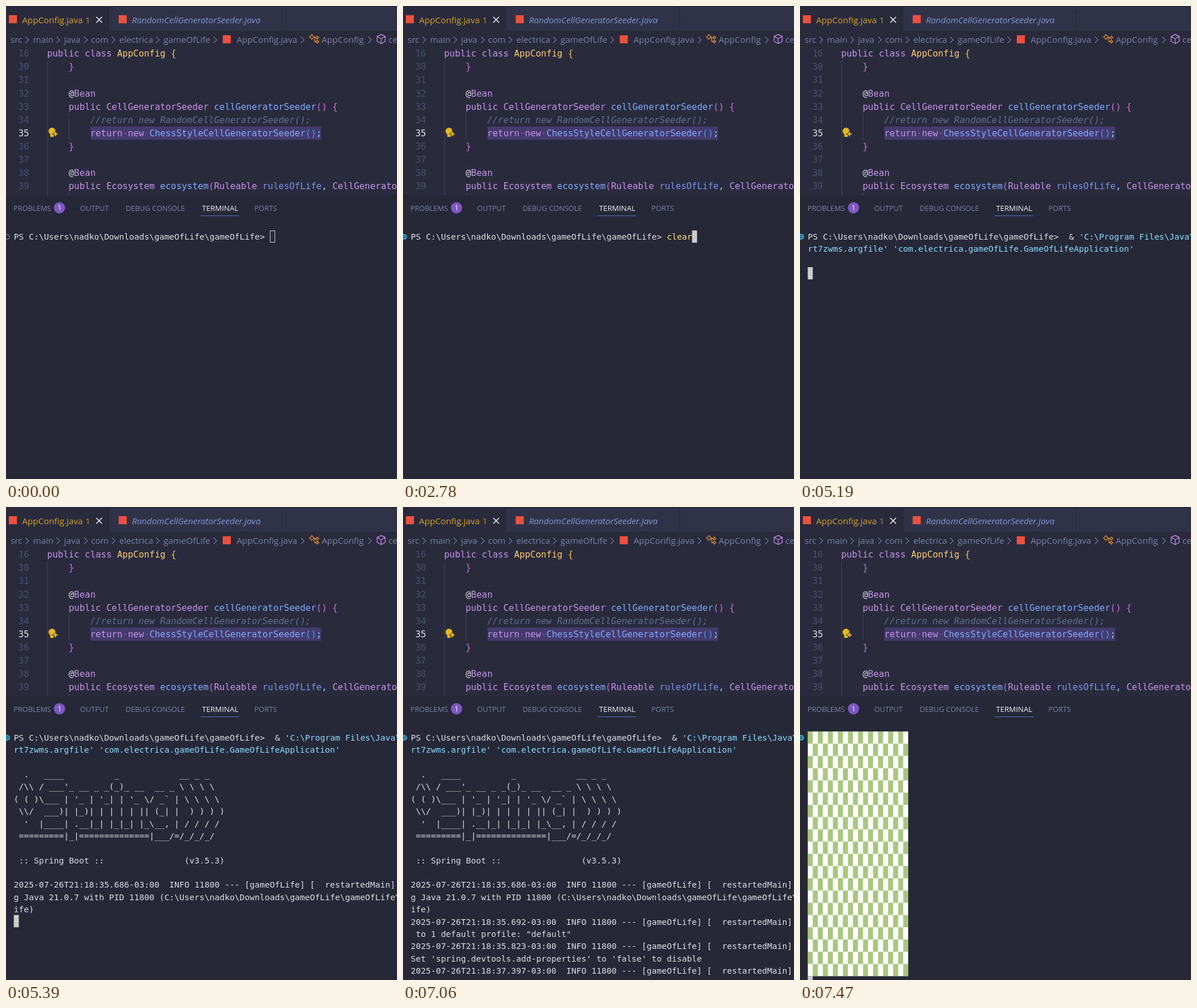
An HTML page that plays this animation: 680x824 px, repeating every 8000 ms.

```html
<!DOCTYPE html>
<html lang="en">
<head>
<meta charset="utf-8">
<title>Terminal run</title>
<style>
html, body { margin: 0; width: 100%; height: 100%; overflow: hidden; background: #262838; }
svg { display: block; position: absolute; left: 0; top: 0; }
text { white-space: pre; }
.code { font: 15.56px "DejaVu Sans Mono", monospace; }
.term { font: 14.51px "DejaVu Sans Mono", monospace; fill: #dcdee4; }
.ui { font: 15.1px "Open Sans", sans-serif; fill: #7b80a2; }
.tab { font: 12.6px "Open Sans", sans-serif; fill: #7d829e; }
.tab.active { font-size: 13.1px; fill: #f0f1f6; }
.timed { opacity: 0; animation: 8s step-end infinite; }
</style>
</head>
<body>
<svg id="stage" width="680" height="824" viewBox="0 0 680 824">
  <defs>
    <clipPath id="editorClip"><rect width="680" height="330"/></clipPath>
    <pattern id="cells" x="13.5" y="391" width="17.47" height="42.64" patternUnits="userSpaceOnUse">
      <rect width="17.47" height="42.64" fill="#fff"/>
      <path d="M0 0h8.735v21.32H0zM8.735 21.32h8.735v21.32H8.735z" fill="#a9c77d"/>
    </pattern>
  </defs>

  <rect width="680" height="330" fill="#292b3d"/>
  <rect width="680" height="43" fill="#303348"/>
  <rect width="180" height="43" fill="#292b3d"/>
  <rect width="680" height="2" fill="#282a3b"/>
  <path d="M480.500 2V43" stroke="#292b3d"/>
  <g fill="#ef4f3b">
    <rect x="5" y="16" width="14" height="14"/>
    <rect x="196" y="16" width="14" height="14"/>
    <rect x="377" y="51" width="14" height="14"/>
  </g>
  <path d="M157 19l10 10m0-10l-10 10" stroke="#f0f0f5" stroke-width="1.500"/>

  <g fill="none" stroke="#e08a2e" stroke-width="1.400">
    <path d="M528 54l4-4 4 4-4 4zM535 55h4M537 55v7h2"/>
    <path d="M539 55l2.500-2.500 2.500 2.500-2.500 2.500zM539 62l2.500-2.500 2.500 2.500-2.500 2.500z"/>
  </g>
  <path d="M652.500 49.500l7 3.500v8.500l-7 4-7-4V53zM645.500 53l7 4 7-4M652.500 57v8.500" fill="none" stroke="#b884dd" stroke-width="1.400"/>

  <g id="editor" clip-path="url(#editorClip)">
    <path d="M72.500 95V330M109.500 186V233M109.500 325V330" stroke="#41445c"/>
    <rect x="147" y="210" width="401" height="23" fill="#443b6d"/>
    <g fill="#e9b818">
      <circle cx="80" cy="218" r="6"/>
      <path d="M77 222h6v6h-6z"/>
      <path d="M86 217l1.700 4.300 4.300 1.700-4.300 1.700-1.700 4.300-1.700-4.300-4.300-1.700 4.300-1.700z" stroke="#292b3d" stroke-width=".8"/>
    </g>
  </g>

  <rect y="330" width="680" height="494" fill="#262838"/>
  <circle cx="93" cy="351.500" r="9.800" fill="#7e57c2"/>
  <path d="M338.500 365.500H405.500" stroke="#5b74bd"/>
</svg>
<script>
const stage = document.getElementById('stage');
const editor = document.getElementById('editor');
const sheet = document.head.appendChild(document.createElement('style')).sheet;

const LOOP = 8000, COL = 8.735, ROW = 21.32, LEFT = 13.5, TOP = 391;
const C = {
  key: '#c792ea', type: '#ffcb6b', fn: '#82aaff', arg: '#7f8ff0', gold: '#f2c63c',
  pink: '#d06fd3', blue: '#3f9cf5', sep: '#89ddff', note: '#666c8e', dim: '#4b4f69',
  text: '#dcdee4', cmd: '#ffe073', dot: '#6f649c'
};

function add(parent, tag, attrs, content) {
  const el = document.createElementNS('http://www.w3.org/2000/svg', tag);
  for (const k in attrs) el.setAttribute(k, attrs[k]);
  if (content) el.textContent = content;
  return parent.appendChild(el);
}

// parts: colour name, text, colour name, text ...
function spans(parent, cls, x, y, parts) {
  const line = add(parent, 'text', { class: cls, x, y });
  for (let i = 0; i < parts.length; i += 2)
    add(line, 'tspan', { fill: C[parts[i]] }, parts[i + 1]);
  return line;
}

// A group visible from one time to another, in ms
let timedCount = 0;
function during(from, to) {
  const name = 'show' + timedCount++;
  const pct = ms => ms / LOOP * 100 + '%';
  const start = from ? `0% { opacity: 0 } ${pct(from)} { opacity: 1 }` : '0% { opacity: 1 }';
  sheet.insertRule(`@keyframes ${name} { ${start} ${pct(to)} { opacity: 0 } 100% { opacity: 0 } }`);
  return add(stage, 'g', { class: 'timed', style: `animation-name: ${name}` });
}

// Tabs and breadcrumbs
const label = (x, y, str, style = '') => add(stage, 'text', { class: 'ui', x, y, style }, str);
label(28, 30, 'AppConfig.java', 'fill:#d6a21e');
label(138, 30, '1', 'fill:#b98f25');
label(219, 30, 'RandomCellGeneratorSeeder.java', 'fill:#8297d4;font-style:italic');
[[8, 'src'], [47, 'main'], [101, 'java'], [148, 'com'], [197, 'electrica'], [274, 'gameOfLife'],
 [401, 'AppConfig.java'], [549, 'AppConfig'], [665, 'cell']].forEach(([x, str]) => label(x, 64, str));
for (const x of [37, 91, 139, 187, 264, 364, 516, 633])
  add(stage, 'path', { d: `M${x - 3} 53.500l5.500 5.500-5.500 5.500`, fill: 'none', stroke: '#6f7495', 'stroke-width': 1.2 });

// Editor
const source = [
  [16, 'key', 'public class ', 'type', 'AppConfig ', 'gold', '{'],
  [30, 'pink', '    }'],
  [31],
  [32, 'text', '    @', 'key', 'Bean'],
  [33, 'key', '    public CellGeneratorSeeder ', 'fn', 'cellGeneratorSeeder', 'pink', '() {'],
  [34, 'note', '        //return new RandomCellGeneratorSeeder();'],
  [35, 'key', '        return', 'dot', '·', 'key', 'new', 'dot', '·',
    'fn', 'ChessStyleCellGeneratorSeeder', 'blue', '()', 'sep', ';'],
  [36, 'pink', '    }'],
  [37],
  [38, 'text', '    @', 'key', 'Bean'],
  [39, 'key', '    public Ecosystem ', 'fn', 'ecosystem', 'pink', '(', 'key', 'Ruleable ',
    'arg', 'rulesOfLife', 'sep', ', ', 'key', 'CellGeneratorSeeder'],
  [40, 'key', '        return new ', 'fn', 'Ecosystem', 'blue', '(',
    'arg', 'rulesOfLife', 'sep', ', ', 'arg', 'initialBoard', 'blue', ')', 'sep', ';']
];
source.forEach(([num, ...parts], i) => {
  const y = 88.2 + i * 23.1;
  spans(editor, 'code', 21.5, y, [num === 35 ? 'text' : 'dim', String(num)]);
  const line = spans(editor, 'code', 71.5, y, parts);
  if (num === 34) line.style.fontStyle = 'italic';
});

// Panel tabs
[[13, 'PROBLEMS'], [129, 'OUTPUT'], [208, 'DEBUG CONSOLE'], [341, 'TERMINAL'], [432, 'PORTS']]
  .forEach(([x, str]) => add(stage, 'text', {
    class: str === 'TERMINAL' ? 'tab active' : 'tab', x, y: 357
  }, str));
add(stage, 'text', { class: 'tab', x: 93, y: 356, 'text-anchor': 'middle', style: 'fill:#fff' }, '1');

// Terminal
const HOME = 'C:\\Users\\nadko\\Downloads\\gameOfLife\\gameOfLife';
const print = (group, row, col, ...parts) =>
  spans(group, 'term', LEFT + col * COL, TOP + 16 + row * 21.37, parts);
const printRows = (group, row, rows) => rows.forEach((str, i) => print(group, row + i, 0, 'text', str));
const log = time => `2025-07-26T21:18:${time}-03:00  INFO 11800 --- [gameOfLife] [  restartedMain]`;

add(during(0, 1800), 'circle', { cx: 2, cy: 402, r: 4, fill: 'none', stroke: '#686c80', 'stroke-width': 1.6 });
add(during(1800, LOOP), 'circle', { cx: 2, cy: 402, r: 4.2, fill: '#23799f', stroke: '#36a8cc', 'stroke-width': 1.8 });

for (const [from, to] of [[0, 1800], [1860, 7410]])
  print(during(from, to), 0, 0, 'text', `PS ${HOME}>`);
for (const [from, to] of [[1270, 1800], [2780, 3000]])
  print(during(from, to), 0, 51, 'cmd', 'clear');

const command = during(3000, 7410);
print(command, 0, 52, 'text', '& ', 'sep', "'C:\\Program Files\\Java\\jdk-21");
print(command, 1, 0, 'sep', "rt7zwms.argfile' 'com.electrica.gameOfLife.GameOfLifeApplication'");

printRows(during(5270, 7410), 3, [
  String.raw`  .   ____          _            __ _ _`,
  String.raw` /\\ / ___'_ __ _ _(_)_ __  __ _ \ \ \ \ `,
  "( ( )\\___ | '_ | '_| | '_ \\/ _` | \\ \\ \\ \\",
  String.raw` \\/  ___)| |_)| | | | | || (_| |  ) ) ) )`,
  String.raw`  '  |____| .__|_| |_|_| |_\__, | / / / /`,
  String.raw` =========|_|==============|___/=/_/_/_/`,
  '',
  ' :: Spring Boot ::                (v3.5.3)'
]);
printRows(during(5340, 7410), 12, [log('35.686'), `g Java 21.0.7 with PID 11800 (${HOME}\\target`, 'ife)']);
printRows(during(5400, 7410), 15, [log('35.692'), ' to 1 default profile: "default"']);
printRows(during(5530, 7410), 17, [log('35.823'), "Set 'spring.devtools.add-properties' to 'false' to disable"]);
printRows(during(7060, 7410), 19, [log('37.397'), 'i']);

add(during(7470, LOOP), 'rect', { x: LEFT, y: TOP, width: 20 * COL, height: 20 * ROW, fill: 'url(#cells)' });

// Cursor: hollow while unfocused, then a block at column, row
add(during(0, 870), 'rect', { x: 459.5, y: 391.5, width: 8, height: 20, fill: 'none', stroke: '#cccccc' });
[[51, 0, 870, 1270], [56, 0, 1330, 1800], [0, 0, 1800, 1860], [51, 0, 1860, 2780],
 [56, 0, 2780, 3000], [66, 1, 3060, 3340], [0, 2, 3340, 5190], [0, 3, 5190, 5270],
 [0, 12, 5270, 5340], [0, 15, 5340, 5400], [0, 17, 5400, 5530], [0, 19, 5530, 7060],
 [0, 0, 7410, 7470], [0, 20, 7470, LOOP]].forEach(([col, row, from, to]) =>
  add(during(from, to), 'rect', {
    x: LEFT + col * COL, y: TOP + row * ROW, width: COL, height: ROW, fill: '#cccccc'
  }));
</script>
</body>
</html>
```
